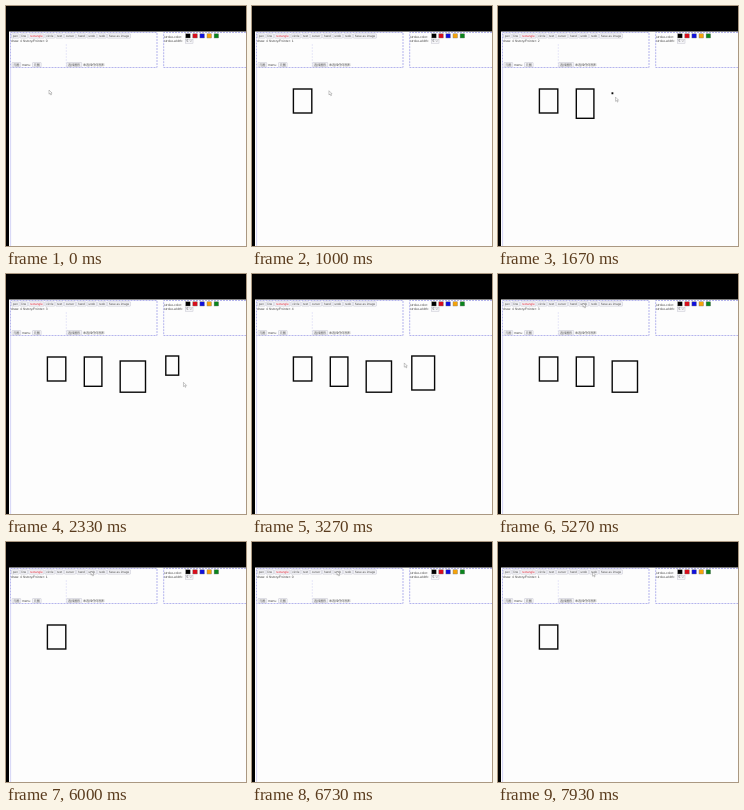
An HTML page that plays this animation: 240 px wide and 240 px high, repeating every 8000 ms.

```html
<!DOCTYPE html>
<html lang="en">
<head>
<meta charset="utf-8">
<title>Drawing board</title>
<style>
  html, body { margin: 0; width: 100%; height: 100%; overflow: hidden; background: #000; }
  svg { display: block; width: 100vw; height: 100vh; }
  text { font: 3.3px "Liberation Sans", Arial, sans-serif; fill: #444; text-rendering: geometricPrecision; }
  .label { font-size: 3.1px; }
  .cjk { font: 3.1px "Noto Sans CJK SC", "Noto Sans CJK", sans-serif; }
  .button { fill: #f5f5f8; stroke: #b4b4c4; stroke-width: .4; }
  .panel { fill: none; stroke: #8484e2; stroke-width: .6; stroke-dasharray: 2 1; }
  .shape { fill: none; stroke: #080808; stroke-width: 1.4; }
</style>
</head>
<body>
<svg viewBox="0 0 240 240">
  <path d="M0 0H240V240H0z"/>
  <path fill="#fdfdfd" d="M3 25.5H240V240H3z"/>
  <path stroke="#c4c4f4" stroke-width=".7" d="M4.6 62V240"/>
  <path class="panel" d="M4.5 26.5H151V61.5H4.5zM240 26.5H157.7V61.5H240"/>
  <path class="panel" opacity=".3" d="M60.3 38V61"/>
  <g id="toolbar"></g>
  <text id="status" x="5" y="36.2"></text>
  <text x="158" y="31.6">stroke-color:</text>
  <g id="swatches"></g>
  <text x="158" y="36.4">stroke-width:</text>
  <rect class="button" x="179.5" y="33.2" width="7.5" height="4"/>
  <text x="180.5" y="36.4">5</text>
  <path d="M184 34.5l.8 1 .8-1" fill="none" stroke="#555" stroke-width=".4"/>
  <g id="shapes"></g>
  <path id="cursor" d="M0 0V4.2L1 3.3 1.8 5 2.5 4.7 1.8 3.1H3.1z" fill="#fff" stroke="#777" stroke-width=".4"/>
</svg>
<script>
const LOOP = 8000;
const DRAG = 400;       // time to pull a box open
const LAG = 60;         // boxes trail the pointer
const LAST_UNDO = 6400;
const UNDO_STEP = 550;
const REDO = 7600;
const byId = id => document.getElementById(id);

function add(parent, tag, attrs, label) {
  const node = document.createElementNS("http://www.w3.org/2000/svg", tag);
  for (const key in attrs) node.setAttribute(key, attrs[key]);
  if (label) node.textContent = label;
  return byId(parent).appendChild(node);
}

// Adds a button sized by its label and returns its right edge.
function addButton(label, x, y, kind = "label") {
  const frame = add("toolbar", "rect", { class: "button", x, y, height: 4.4, rx: .5 });
  const text = add("toolbar", "text", { class: kind, x: x + 1.25, y: y + 3.3 }, label);
  if (label === "rectangle") text.style.fill = "#e02030";
  const width = text.getComputedTextLength() + 2.5;
  frame.setAttribute("width", width);
  return x + width;
}

["pen", "line", "rectangle", "circle", "text", "cursor", "hand", "undo", "redo", "Save as image"]
  .reduce((x, label) => addButton(label, x, 27.8) + 1.1, 5.5);

for (const [label, x] of [["元图", 6], ["元图", 26.5], ["选择图形", 60.8]]) addButton(label, x, 56.5, "cjk");
add("toolbar", "text", { x: 16, y: 60 }, "menu");
add("toolbar", "text", { class: "cjk", x: 77, y: 60 }, "未选择任何图形");

["#000", "#d80d1c", "#1010dc", "#f6a30a", "#0a851c"].forEach((fill, i) =>
  add("swatches", "rect", { x: 179.7 + i * 7.1, y: 27.8, width: 4.5, height: 4.2, fill, stroke: "#777", "stroke-width": .4 }));

const boxes = [
  { x: 41.4, y: 83, width: 18.4, height: 24, start: 200 },
  { x: 78.3, y: 83, width: 17.6, height: 29.3, start: 1080 },
  { x: 114.2, y: 87, width: 25.3, height: 31.2, start: 1580 },
  { x: 159.8, y: 82, width: 22.8, height: 34, start: 2054 }
].map((box, i) => ({
  ...box,
  undo: LAST_UNDO - i * UNDO_STEP,
  node: add("shapes", "rect", { class: "shape", x: box.x, y: box.y })
}));

// Pointer stops: drag each box corner to corner, then visit undo and redo.
const stops = [
  [0, 43, 84],
  ...boxes.flatMap(({ x, y, width, height, start }) =>
    [[start, x, y], [start + DRAG, x + width, y + height]]),
  [2900, 182.6, 116], [3900, 85, 29], [6750, 85, 29], [7250, 94.5, 30], [LOOP, 94.5, 30]
];

const ease = p => p * p * (3 - 2 * p);
const progress = (t, start, end) => ease(Math.max(0, Math.min(1, (t - start) / (end - start))));

function pointerAt(t) {
  const i = stops.findIndex(stop => stop[0] > t);
  const [t0, x0, y0] = stops[i - 1], [t1, x1, y1] = stops[i];
  const p = progress(t, t0, t1);
  return [x0 + (x1 - x0) * p, y0 + (y1 - y0) * p];
}

function draw(t) {
  let count = 0;
  boxes.forEach(({ width, height, start, undo, node }, i) => {
    const shownFrom = start + LAG;
    const visible = (t >= shownFrom && t < undo) || (i === 0 && t >= REDO);
    const p = progress(t, shownFrom, shownFrom + DRAG);
    node.style.display = visible ? "" : "none";
    node.setAttribute("width", width * p);
    node.setAttribute("height", height * p);
    if (visible && p === 1) count++;
  });
  byId("status").textContent = `draw: 4 history/Pointer: ${count}`;
  byId("cursor").setAttribute("transform", `translate(${pointerAt(t)})`);
}

const begin = performance.now();
function tick() {
  draw((performance.now() - begin) % LOOP);
  requestAnimationFrame(tick);
}
tick();
</script>
</body>
</html>
```
